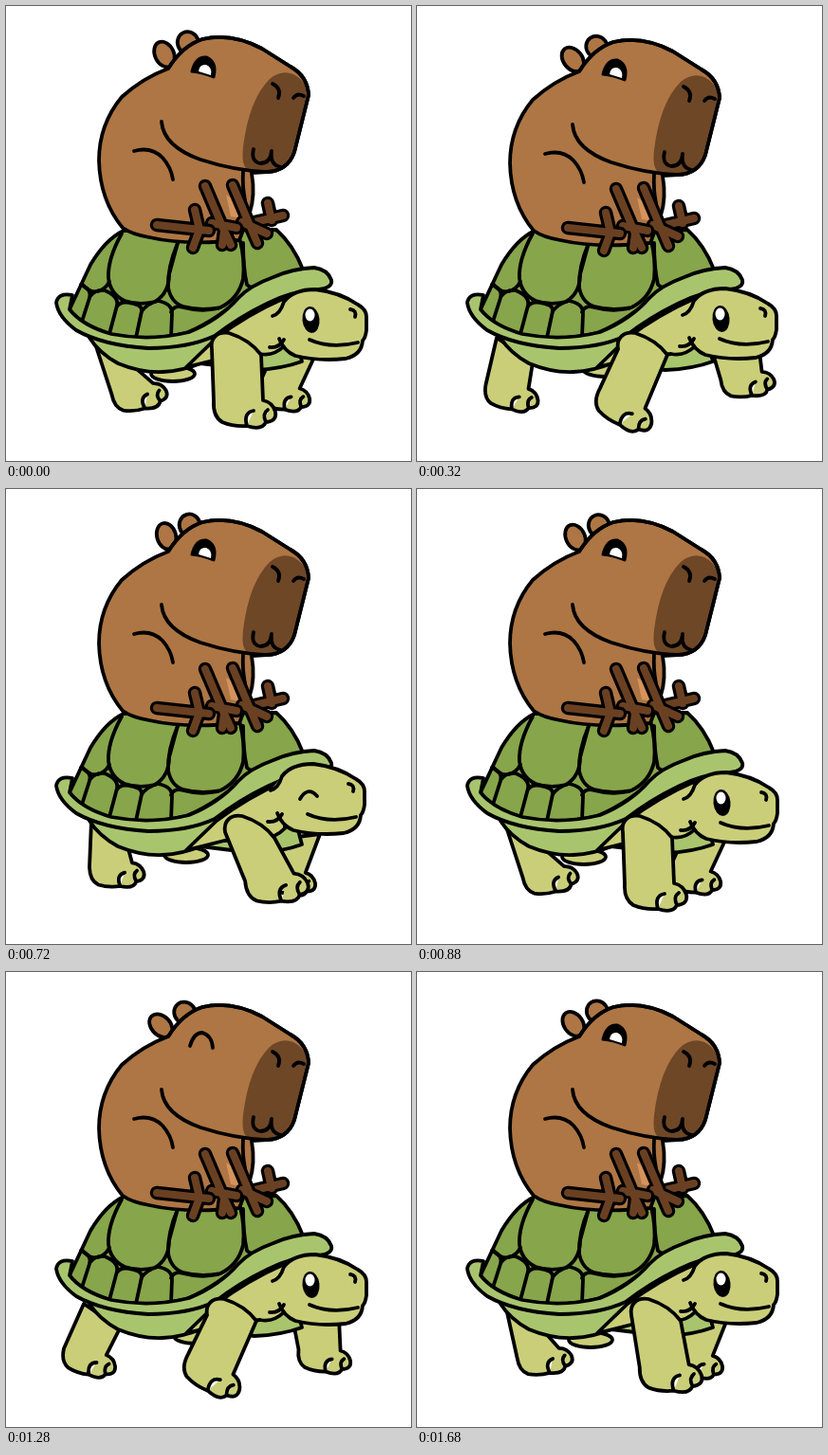
Animation, 427 px wide and 480 px high, one loop 1.76 s. Source, as an HTML page:

```html
<!DOCTYPE html>
<html lang="en">
<head>
<meta charset="utf-8">
<title>Slow ride</title>
<style>
  html, body { margin: 0; width: 100%; height: 100%; overflow: hidden; background: #fff; }
  svg { display: block; width: 100vw; height: 100vh; }
  .ink { stroke: #000; stroke-width: 3.8; stroke-linecap: round; stroke-linejoin: round; fill: none; }
  .skin { fill: #cace79; }
  .rim { fill: #a8c56e; }
  .shell { fill: #87a54b; }
  .fur { fill: #ae7644; }
  .dark { fill: #6e4727; }
  .edge { stroke-width: 14.5; }
  .stick { stroke: #6a4022; stroke-width: 8; }
</style>
</head>
<body>
<svg viewBox="0 0 427 480">
  <ellipse id="farHind" class="ink skin" rx="23" ry="8"/>
  <path id="farFront" class="ink skin"/>
  <path id="nearHind" class="ink skin"/>

  <path class="ink rim" d="M88 350Q98 366 118 377Q142 387 165 386Q186 385 205 377L262 384Q290 383 312 375L300 330L200 340Z"/>
  <path class="ink skin" d="M190 381L222 350Q255 325 294 308L294 358Q282 370 268 367L230 371Z"/>

  <g class="ink">
    <path class="shell" d="M124 237Q105 246 89 273L67 320Q75 337 110 347Q150 354 190 345Q225 330 255 301L313 278Q303 252 285 236Z"/>
    <path d="M122 240Q107 267 108 287Q110 304 125 311Q140 316 157 312Q172 303 172 283L181 250"/>
    <path d="M181 250Q170 276 171 297Q174 313 187 317Q205 322 226 318Q245 309 250 288Q252 268 247 248"/>
    <path d="M250 250Q250 276 254 294Q260 300 270 294"/>
    <path d="M80 293Q88 303 96 301Q104 300 109 291"/>
    <path d="M79 294Q91 299 88 308L80 333"/>
    <path d="M89 306Q94 299 104 300Q119 306 117 316L109 346"/>
    <path d="M117 317Q121 311 130 313Q144 315 143 322L137 350"/>
    <path d="M143 322Q149 314 160 311Q176 314 175 325L174 349"/>
    <path d="M174 323Q177 315 187 318Q205 323 224 319"/>
    <path class="rim" d="M70 305Q55 302 53 313Q55 328 74 342Q102 358 150 361Q192 361 220 348Q246 328 275 314Q300 301 330 299Q345 297 343 289Q339 278 325 276Q302 277 282 286Q257 295 245 308Q225 331 193 344Q152 354 111 346Q80 337 67 320Z"/>
  </g>

  <path id="nearFront" class="ink skin"/>

  <g id="head" class="ink">
    <path class="skin" stroke="none" style="stroke:none" d="M281 327L293 312Q303 299 326 299Q352 302 371 315Q380 320 380 328V342Q379 350 376 353Q375 368 358 372Q330 375 305 369Q293 364 288 351Z"/>
    <path d="M281 327Q289 325 293 312Q303 299 326 299Q352 302 371 315Q380 320 380 328V342Q379 350 376 353Q375 368 358 372Q330 375 305 369Q293 364 288 351"/>
    <path d="M278 360Q288 361 293 352M320 352Q342 362 371 355M363 320Q370 321 368 328"/>
    <g id="turtleOpen" stroke="none">
      <ellipse cx="321.5" cy="331" rx="9" ry="14" fill="#000" transform="rotate(-6 321 331)"/>
      <ellipse cx="320.5" cy="326" rx="5" ry="6.5" fill="#fff"/>
    </g>
    <path id="turtleShut" d="M312 336Q320 322 330 333"/>
  </g>

  <g id="capy" class="ink">
    <g id="earFar"><ellipse class="fur" cx="167" cy="51" rx="10" ry="14" transform="rotate(-25 167 51)"/></g>
    <g id="earNear"><ellipse class="fur" cx="192" cy="39" rx="11" ry="12" transform="rotate(-25 192 39)"/></g>
    <path class="fur" d="M171 66Q186 42 207 35Q238 28 270 45L300 64Q318 74 319 94Q313 118 304 154Q297 174 275 175L259 176Q263 200 257 218L246 247Q190 253 151 244Q133 241 123 234Q99 205 98 163Q98 125 122 96Q144 76 171 66Z"/>
    <path d="M250 174Q249 190 252 205"/>
    <path d="M232 199Q246 207 247 224L237 222Z" fill="#d5925b" style="stroke:none"/>
    <path class="dark" style="stroke:none" d="M278 77Q290 67 303 72Q317 79 317 94Q311 119 302 153Q295 172 277 173L254 172Q248 167 250 149Q256 99 278 77Z"/>
    <path d="M171 66Q186 42 207 35Q238 28 270 45L300 64Q318 74 319 94Q313 118 304 154Q297 174 275 175Q242 174 205 162Q166 148 164 122"/>
    <path d="M135 153Q153 148 165 160Q174 170 176 183"/>
    <path d="M281 82Q291 87 287 97M303 97Q307 91 314 95M261 151Q258 164 268 166Q279 166 280 153Q278 168 290 170"/>
    <g id="capyOpen">
      <path d="M196 69Q200 53 211 54Q223 59 219 75Q208 70 196 69Z" fill="#000" stroke-width="3"/>
      <path d="M203 69Q204 61 211 62Q218 65 216 73Z" fill="#fff" style="stroke:none"/>
    </g>
    <path id="capyShut" d="M194 76Q198 62 207 62Q217 65 218 78"/>
    <g id="hands"></g>
  </g>
</svg>
<script>
const LOOP = 1760, STRIDE = 880;
const PHASES = [0, 120, 320, 400, 560, 720, 800];
const $ = id => document.getElementById(id);

// Each row lists one value's pose through the stride, at PHASES.
const POSES = {
  nearFront: {
    hip: [217, 212, 212, 212, 224, 231, 226],
    x: [246, 221.5, 214, 213, 259, 280, 262],
    y: [425, 422, 422, 422, 412, 418, 424],
    turn: [0, 20, 25, 25, -5, -8, -2]
  },
  nearHind: {
    hip: [92, 91, 84, 82, 87, 90, 93],
    x: [136, 114, 95, 83, 106, 112, 130],
    y: [411, 413, 409, 408, 396, 404, 409],
    turn: [-14, 0, 7, 10, -8, -5, -12]
  },
  farFront: {
    hip: [280, 294, 313, 303, 292, 283, 280],
    x: [288, 321, 344, 331, 317, 294, 290],
    y: [410, 393, 397, 406, 404, 411, 411],
    turn: [3, 0, -10, 3, 0, 4, 4]
  },
  farHind: {
    x: [176, 175, 198, 200, 200, 190, 183],
    y: [388, 388, 383, 384, 388, 386, 388]
  },
  bob: {
    capy: [0, 2, 3, 2, -1, 0, 2],
    ear: [0, -5, -13, -19, 16, 9, -10],
    headX: [0, 0, -1, 0, 0, -2, 0],
    headY: [0, -1, -1, -1, -3, -9, -2]
  }
};

// Smooth periodic curve through the poses.
function sample(row, phase) {
  const n = PHASES.length;
  const at = i => PHASES[(i + n) % n] + STRIDE * Math.floor(i / n);
  const val = i => row[(i + n) % n];
  const slope = i => (val(i + 1) - val(i - 1)) / (at(i + 1) - at(i - 1));
  let i = n - 1;
  while (at(i) > phase) i--;
  const span = at(i + 1) - at(i), u = (phase - at(i)) / span;
  const u2 = u * u, u3 = u2 * u;
  return val(i) * (2 * u3 - 3 * u2 + 1) + val(i + 1) * (3 * u2 - 2 * u3) +
    span * (slope(i) * (u3 - 2 * u2 + u) + slope(i + 1) * (u3 - u2));
}

function pose(name, phase) {
  const out = {};
  for (const key in POSES[name]) out[key] = sample(POSES[name][key], phase);
  return out;
}

function legPath({ x, y, turn }, size, from, to, top) {
  const a = turn * Math.PI / 180, c = Math.cos(a) * size, s = Math.sin(a) * size;
  const p = (u, v) => `${(x + u * c - v * s).toFixed(2)} ${(y + u * s + v * c).toFixed(2)} `;
  return `M${from}L${p(-27, -8)}Q${p(-28, 8)}${p(-18, 14)}Q${p(-6, 19)}${p(8, 18)}` +
    `Q${p(24, 23)}${p(28, 14)}Q${p(40, 13)}${p(38, 3)}Q${p(35, -7)}${p(25, -9)}L${to}${top}` +
    `M${p(8, 18)}Q${p(4, 4)}${p(15, 2)}M${p(28, 14)}Q${p(24, 5)}${p(30, 1)}`;
}

const HANDS = [
  'M276 208L280 226M258 229L292 221',
  'M239 189L265 250M249 228L275 240',
  'M210 190L230 237L228 252M217 229L243 234M230 237L237 252',
  'M159 231L214 237M199 215L204 236L197 255'
];
$('hands').innerHTML = HANDS.map(d =>
  `<path class="edge" d="${d}"/><path class="stick" d="${d}"/>`).join('');

// Drawn on forties, with a few held drawings.
function tick(ms) {
  const t = Math.floor(ms / 40) * 40;
  if (t < 120) return 0;
  return [760, 1040, 1240, 1720].includes(t) ? t - 40 : t;
}

const show = (id, on) => { $(id).style.display = on ? '' : 'none'; };
const move = (id, value) => $(id).setAttribute('transform', value);

function draw(t) {
  const phase = t % STRIDE;

  let l = pose('nearFront', phase), h = l.hip, r = h + 52;
  $('nearFront').setAttribute('d', legPath(l, 1, `${h} 362`, `${r} 368`,
    `Q${r - 12} 352 ${h + 18} 345C${h + 6} 343 ${h - 2} 350 ${h} 362`));

  l = pose('nearHind', phase);
  $('nearHind').setAttribute('d', legPath(l, 0.87, `${l.hip} 350`, `${l.hip + 38} 376`, 'Z'));

  l = pose('farFront', phase);
  $('farFront').setAttribute('d', legPath(l, 0.85, `${l.hip} 370`, `${l.hip + 48} 364`, 'Z'));

  l = pose('farHind', phase);
  move('farHind', `translate(${l.x} ${l.y})`);

  const b = pose('bob', phase);
  move('capy', `translate(0 ${b.capy})`);
  move('earFar', `rotate(${b.ear} 176 64)`);
  move('earNear', `rotate(${b.ear} 197 50)`);
  move('head', `translate(${b.headX} ${b.headY})`);

  const turtleBlink = t >= 680 && t < 800, capyBlink = t >= 1240 && t < 1360;
  show('turtleOpen', !turtleBlink);
  show('turtleShut', turtleBlink);
  show('capyOpen', !capyBlink);
  show('capyShut', capyBlink);
}

const start = performance.now();
function loop() {
  draw(tick((performance.now() - start) % LOOP));
  requestAnimationFrame(loop);
}
loop();
</script>
</body>
</html>
```
